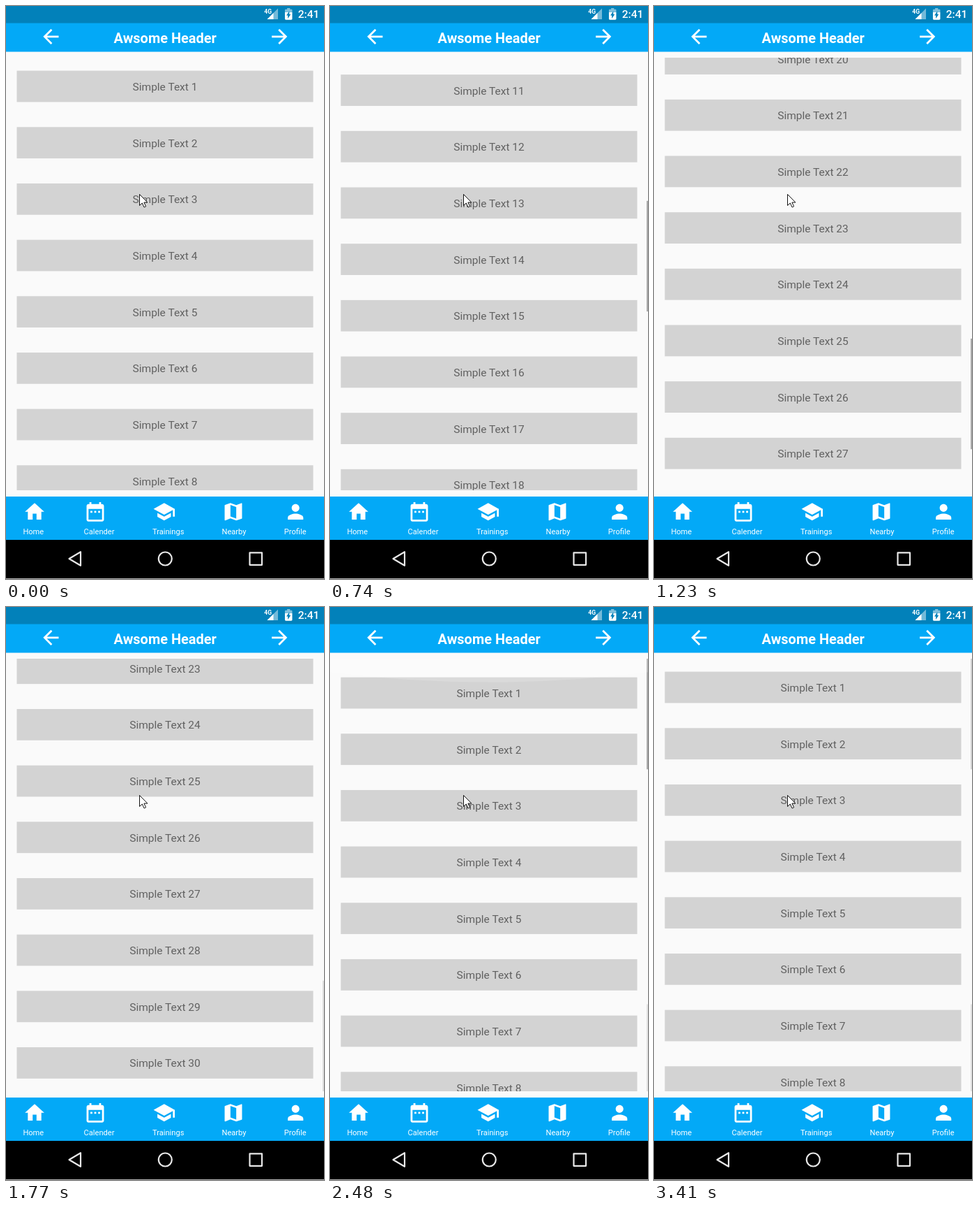
An HTML page for the animation above (4.02 s loop, 456 px wide and 820 px high).

```html
<!DOCTYPE html>
<html lang="en">
<head>
<meta charset="utf-8">
<title>Scrolling list</title>
<style>
  html, body { margin: 0; width: 100%; height: 100%; overflow: hidden; background: #fafafa; }
  svg { display: block; width: 456px; height: 820px; font-family: Roboto, sans-serif; }
  text { text-anchor: middle; }
</style>
</head>
<body>
<svg viewBox="0 0 456 820">
  <defs>
    <clipPath id="view"><rect y="74" width="456" height="619"/></clipPath>
    <linearGradient id="charge" x2="0" y2="1">
      <stop offset=".35" stop-color="#fff" stop-opacity=".5"/>
      <stop offset=".35" stop-color="#fff"/>
    </linearGradient>
  </defs>
  <rect width="456" height="820" fill="#fafafa"/>

  <g clip-path="url(#view)">
    <g id="list"></g>
    <rect id="trace" x="454" y="568.5" width="2" height="124.5" fill="#000" opacity=".1"/>
    <rect id="thumb" x="454" width="2" height="158.3" fill="#000"/>
    <path id="glow" fill="#fff"/>
  </g>

  <!-- status bar -->
  <rect width="456" height="25" fill="#0281ba"/>
  <text x="375.7" y="11" font-size="8.5" font-weight="700" fill="#fff">4G</text>
  <path d="M374.5 19 390 3.5V19Z" fill="#fff" opacity=".45"/>
  <path d="M374.5 19 383.5 10V19Z" fill="#fff"/>
  <path transform="translate(392.6 1.4) scale(1.05 .83)" fill="url(#charge)" d="M15.67 4H14V2h-4v2H8.33C7.6 4 7 4.6 7 5.33v15.33C7 21.4 7.6 22 8.33 22h7.33c.74 0 1.34-.6 1.34-1.33V5.33C17 4.6 16.4 4 15.67 4zM11 20v-5.5H9L13 7v5.5h2L11 20z"/>
  <text x="434" y="17.3" font-size="15.5" font-weight="500" fill="#fff">2:41</text>

  <!-- header and tab bar -->
  <rect y="24.5" width="456" height="41" fill="#03a9f7"/>
  <text x="228.2" y="52.7" font-size="19.95" font-weight="700" fill="#fff">Awsome Header</text>
  <rect y="702" width="456" height="62" fill="#03a9f7"/>
  <g id="icons" fill="#fff" font-size="11.08"></g>

  <!-- system buttons -->
  <rect y="764" width="456" height="56"/>
  <rect y="819" width="456" height="1" fill="#b0b0b0"/>
  <g fill="none" stroke="#e8e8e8" stroke-width="2.2" stroke-linejoin="round">
    <path d="M90.5 791 107 781.2V800.8Z"/>
    <circle cx="228.3" cy="791" r="9.5"/>
    <rect x="349.5" y="782.3" width="17.5" height="17.5"/>
  </g>

  <path d="M191.5 269.5v16l3.8-3.5 2.8 6 2.5-1.2-2.7-5.7h5Z" fill="#fff" stroke="#111"/>
</svg>
<script>
const $ = id => document.getElementById(id);
const PITCH = 80.67, END = 1802, VIEW = 619, LOOP = 4020;

for (let i = 0; i < 30; i++) {
  const y = 92.6 + i * PITCH;
  $('list').innerHTML += `<rect x="15.5" y="${y}" width="425" height="44.8" fill="#d3d3d3"/>
    <text x="228" y="${y + 28.4}" font-size="15.5" fill-opacity=".54">Simple Text ${i + 1}</text>`;
}

const arrow = 'M20 11H7.83l5.59-5.59L12 4l-8 8 8 8 1.41-1.41L7.83 13H20v-2z';
const tabs = [
  ['Home', 39.3, 41, 'M10 20v-6h4v6h5v-8h3L12 3 2 12h3v8z'],
  ['Calender', 133.5, 128, 'M9 11H7v2h2v-2zm4 0h-2v2h2v-2zm4 0h-2v2h2v-2zm2-7h-1V2h-2v2H8V2H6v2H5c-1.11 0-1.99.9-1.99 2L3 20c0 1.1.89 2 2 2h14c1.1 0 2-.9 2-2V6c0-1.1-.9-2-2-2zm0 16H5V9h14v11z'],
  ['Trainings', 232.7, 226.8, 'M5 13.18v4L12 21l7-3.82v-4L12 17l-7-3.82zM12 3L1 9l11 6 9-4.91V17h2V9L12 3z'],
  ['Nearby', 327, 326, 'M20.5 3l-.16.03L15 5.1 9 3 3.36 4.9c-.21.07-.36.25-.36.48V20.5c0 .28.22.5.5.5l.16-.03L9 18.9l6 2.1 5.64-1.9c.21-.07.36-.25.36-.48V3.5c0-.28-.22-.5-.5-.5zM15 19l-6-2.11V5l6 2.11V19z'],
  ['Profile', 414.7, 415.2, 'M12 12c2.21 0 4-1.79 4-4s-1.79-4-4-4-4 1.79-4 4 1.79 4 4 4zm0 2c-2.67 0-8 1.34-8 4v2h16v-2c0-2.66-5.33-4-8-4z']
];
const icon = (x, y, d, flip = 1) =>
  `<path transform="translate(${x} ${y}) scale(${1.385 * flip} 1.385) translate(-12 -12)" d="${d}"/>`;
$('icons').innerHTML = icon(64.4, 43.8, arrow) + icon(392.2, 43.8, arrow, -1) +
  tabs.map(([name, tx, ix, d]) => icon(ix, 723.8, d) + `<text x="${tx}" y="755.7">${name}</text>`).join('');

// The picture only refreshes at these moments.
const steps = [0, 590, 690, 765, 840, 915, 990, 1060, 1160, 1240, 1315, 1390, 1470, 1545, 1620, 1690, 1770,
  2100, 2180, 2250, 2330, 2400, 2480, 2550, 2720, 2800, 2950, 3030, 3110, 3340, 3410];

// Fling down, rest, fling up, then a small overshoot that springs back.
function scrollAt(t) {
  if (t < 590) return 0;
  if (t < 2100) return END - 1239 * Math.max(0, (1620 - t) / 1030) ** 2.09;
  if (t < 2320) return 1314 - 5.967 * (t - 2100);
  const u = Math.min(1, (t - 2320) / 480);
  return -8.5 * Math.sqrt(1 - u * u);
}

function thumbAt(t) {
  if (t < 590) return 0;
  if (t < 1690) return .32;
  if (t < 1770) return .22;
  if (t < 2100) return .12;
  return t < 3340 ? .32 : t < 3410 ? .24 : .16;
}

function glowAt(t) {
  if (t < 2320 || t >= 3110) return 0;
  return t < 2620 ? (t - 2320) / 300 : (1 - (t - 2620) / 600) ** 2;
}

function draw(now) {
  const clock = now % LOOP;
  const t = steps.filter(s => s <= clock).pop();
  const y = scrollAt(t), rise = Math.min(1, Math.max(0, (t - 2320) / 200));
  $('list').setAttribute('transform', `translate(0 ${-y})`);
  $('thumb').setAttribute('y', 74 + Math.max(0, y) * VIEW / (END + VIEW));
  $('thumb').setAttribute('opacity', thumbAt(t));
  $('trace').setAttribute('visibility', t < 2100 ? 'hidden' : 'visible');
  $('glow').setAttribute('d', `M0 74V${74 + 24 * rise}Q228 ${74 + 60 * rise} 456 ${74 + 24 * rise}V74Z`);
  $('glow').setAttribute('opacity', .3 * glowAt(t));
}

const start = performance.now();
function tick() {
  draw(performance.now() - start);
  requestAnimationFrame(tick);
}
tick();
</script>
</body>
</html>
```
